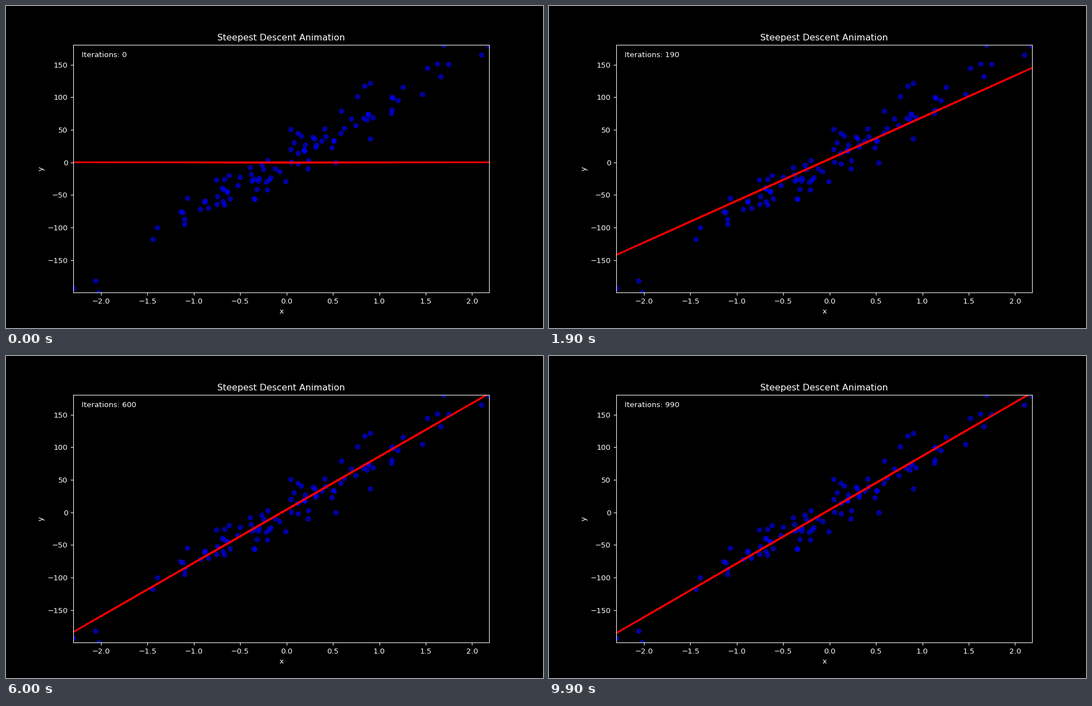
A matplotlib script that plays this animation: 966 px wide and 580 px high, repeating every 10 s.

```python
import numpy as np
import matplotlib.pyplot as plt
from matplotlib.animation import FuncAnimation

W, H, DPI = 966, 580, 96.6
FRAMES, INTERVAL = 100, 100
STEPS_PER_FRAME = 10
RATE = 0.01


def make_data(n=100, noise=20.0, seed=1):
    """Noisy straight line through the origin, in shuffled order."""
    rng = np.random.RandomState(seed)
    x = rng.standard_normal(n)
    slope = 100 * rng.uniform()
    y = slope * x + rng.normal(scale=noise, size=n)
    order = np.arange(n)
    rng.shuffle(order)
    return x[order], y[order]


def descend(x, y, steps):
    """Intercept and slope after each gradient step, starting from zero."""
    A = np.column_stack([np.ones_like(x), x])
    theta = np.zeros(2)
    path = [theta]
    for _ in range(steps):
        theta = theta - RATE * A.T @ (A @ theta - y) / len(y)
        path.append(theta)
    return path


x, y = make_data()
path = descend(x, y, FRAMES * STEPS_PER_FRAME)

plt.style.use("dark_background")
plt.rcParams["font.family"] = "DejaVu Sans"

# The tiny margin keeps the pixel size from rounding down.
fig, ax = plt.subplots(figsize=((W + 1e-6) / DPI, (H + 1e-6) / DPI), dpi=DPI)
ax.scatter(x, y, color="blue", alpha=0.6)
# Unsnapped, so the flat start sits at the same height as the tilted poses.
line, = ax.plot(x, np.zeros_like(x), color="red", lw=2, snap=False)
label = ax.text(0.02, 0.95, "", transform=ax.transAxes, color="white")
ax.set_xlim(x.min(), x.max())
ax.set_ylim(y.min(), y.max())
ax.set_title("Steepest Descent Animation")
ax.set_xlabel("x")
ax.set_ylabel("y")


def update(i):
    step = i * STEPS_PER_FRAME
    intercept, slope = path[step]
    line.set_ydata(intercept + slope * x)
    label.set_text(f"Iterations: {step}")
    return line, label


anim = FuncAnimation(fig, update, frames=FRAMES, interval=INTERVAL,
                     repeat=True, repeat_delay=0)
plt.show()
```
